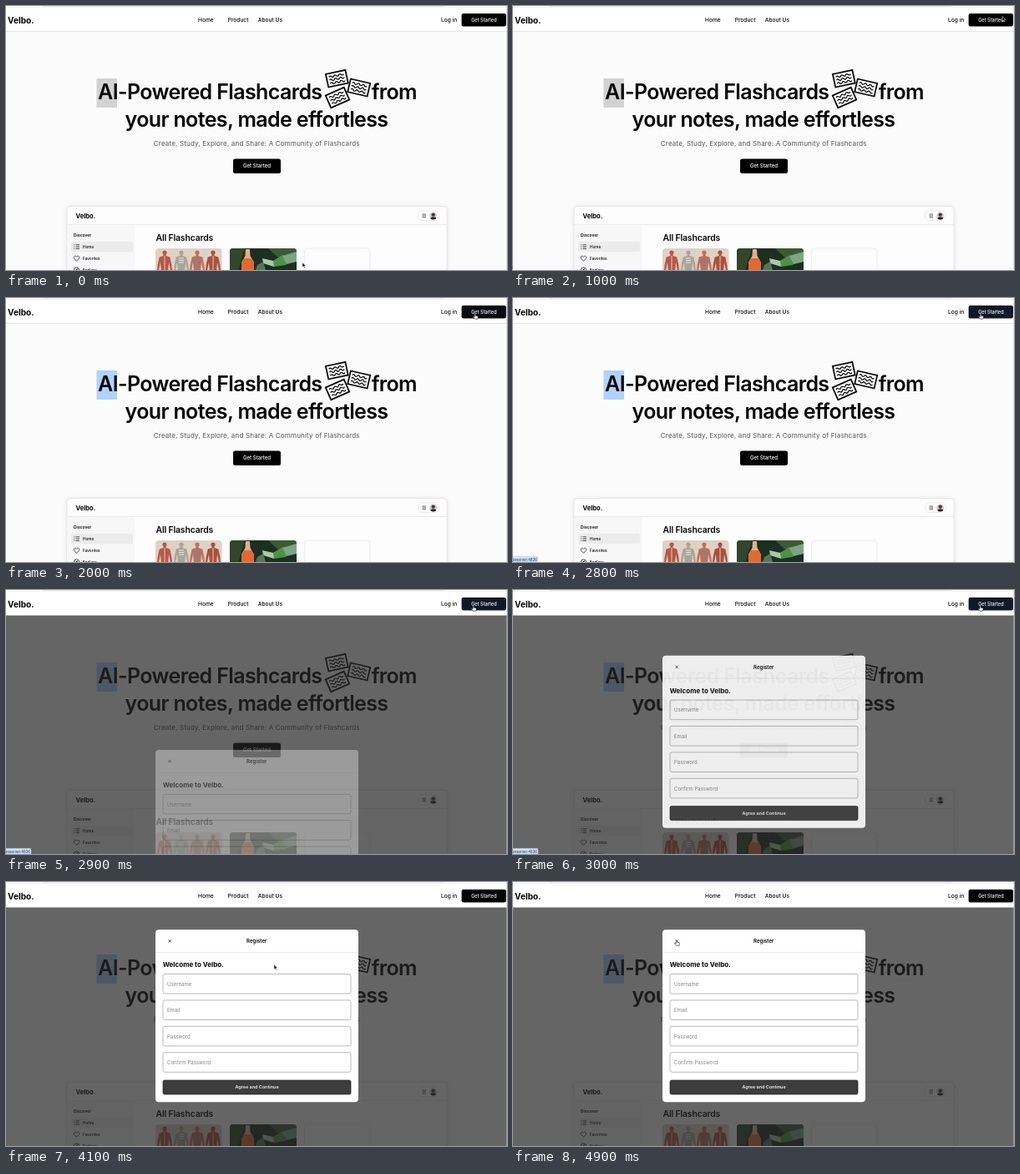
Animation, 600 px wide and 317 px high, one loop 5000 ms. Source, as an HTML page:

```html
<!DOCTYPE html>
<html lang="en">
<head>
<meta charset="utf-8">
<title>Flashcards</title>
<style>
  html, body { margin: 0; width: 100%; height: 100%; overflow: hidden; background: #fbfbfb; }
  svg { display: block; width: 100vw; height: 100vh; }
  text { font-family: Inter, Roboto, sans-serif; font-weight: 500; fill: #050505; }
  .logo { font-weight: 700; }
  .mid { text-anchor: middle; }
  .hero { font-size: 25px; font-weight: 600; letter-spacing: -.025em; }
  .sub { font-size: 8px; font-weight: 400; letter-spacing: .18px; fill: #555; }
  .nav { font-size: 6.6px; }
  .side { font-size: 4.7px; }
  .semi { font-weight: 600; }
  .light { fill: #fff; }
  .label { font-size: 6px; font-weight: 400; fill: #858585; }
  .line { fill: none; stroke: #222; stroke-width: .8; }
</style>
</head>
<body>
<svg viewBox="0 0 600 317">
  <defs>
    <g id="sheet" fill="none" stroke="#0a0a0a">
      <rect x="-12" y="-8" width="24" height="16" fill="#fff" stroke-width="1.8"/>
      <path id="wave" stroke-width="1.3" d="M-9-3.8q1.5-2 3 0t3 0 3 0 3 0 3 0 3 0"/>
      <use href="#wave" y="4"/>
      <use href="#wave" y="8"/>
    </g>
    <g id="body">
      <circle cy="296" r="2.6"/>
      <path d="M-1.2 298h2.4l.5 2 4.6 1.5 2 9 .7 7H7l-2-10-.8 10h-8.4L-5 307.500l-2 10H-9l.7-7 2-9L-1.700 300z"/>
    </g>
    <clipPath id="thumbA"><rect x="179" y="291" width="79.500" height="40" rx="4"/></clipPath>
    <clipPath id="thumbB"><rect x="268" y="291" width="80" height="40" rx="4"/></clipPath>
    <clipPath id="face"><circle cx="511.700" cy="252" r="4.600"/></clipPath>
    <filter id="soft" x="-10%" y="-10%" width="120%" height="120%"><feGaussianBlur stdDeviation="2.500"/></filter>
  </defs>

  <rect width="600" height="317" fill="#fbfbfb"/>

  <!-- Hero -->
  <rect id="mark" x="108.500" y="87" width="24.500" height="35"/>
  <text class="hero mid" x="244.300" y="111.500">AI-Powered Flashcards</text>
  <text class="hero mid" x="464.800" y="111.500">from</text>
  <text class="hero mid" x="300" y="144.500">your notes, made effortless</text>
  <use href="#sheet" transform="translate(396.300 87.200) rotate(-12)"/>
  <use href="#sheet" transform="translate(422.700 98) rotate(13)"/>
  <use href="#sheet" transform="translate(397 110) rotate(-24)"/>
  <text class="sub mid" x="300.300" y="168">Create, Study, Explore, and Share: A Community of Flashcards</text>
  <rect x="272" y="183.500" width="57" height="17.500" rx="2.500"/>
  <text class="mid light" x="300.500" y="194.400" font-size="6.100">Get Started</text>

  <!-- Dashboard preview -->
  <rect x="73" y="241" width="455" height="90" rx="4" fill="#bbb" opacity=".45" filter="url(#soft)"/>
  <rect x="73" y="240.500" width="455" height="90" rx="4" fill="#fdfdfd" stroke="#e2e2e2" stroke-width=".8"/>
  <rect x="73.400" y="262.500" width="81" height="60" fill="#f7f7f7"/>
  <path d="M73 262.500H528" stroke="#e8e8e8" stroke-width=".8"/>
  <text class="logo" x="83.500" y="254.800" font-size="7.600">Velbo.</text>
  <rect x="493.500" y="246" width="24.500" height="11.500" rx="4.500" fill="#fff" stroke="#e0e0e0" stroke-width=".7"/>
  <path class="line" d="M498.500 250h4.500m-4.500 1.900h4.500m-4.500 1.900h4.500" style="stroke-width:.7"/>
  <g clip-path="url(#face)">
    <rect x="507" y="247" width="10" height="10" fill="#d5d0cc"/>
    <circle cx="511.700" cy="250.600" r="2.200" fill="#4a3a34"/>
    <ellipse cx="511.700" cy="256.500" rx="4" ry="3.300" fill="#23252b"/>
  </g>
  <text class="semi" x="81" y="277" font-size="5">Discover</text>
  <rect x="78" y="283" width="74" height="12.300" rx="2" fill="#ebebeb"/>
  <path class="line" d="M83.500 286.800h4.500m-4.500 2.300h4.500m-4.500 2.300h4.500M81.300 286.800h1m-1 2.300h1m-1 2.300h1"/>
  <path class="line" d="M84.500 306.300l-2.900-3c-1.500-2.200 1.400-4.400 2.900-2 1.500-2.400 4.400-.2 2.900 2z"/>
  <circle class="line" cx="84.500" cy="317" r="3.200"/>
  <path d="M86.300 315l-1.200 2.600-2.400 1.300 1.200-2.600z" fill="#222"/>
  <text class="side" x="92" y="291.200">Home</text>
  <text class="side" x="92" y="304.900">Favorites</text>
  <text class="side" x="92" y="318.700">Explore</text>
  <text class="semi" x="179.500" y="281.500" font-size="10.400" letter-spacing="-.15">All Flashcards</text>

  <g clip-path="url(#thumbA)">
    <rect x="179" y="291" width="80" height="30" fill="#dfd2c3"/>
    <use href="#body" x="190" fill="#b4584a"/>
    <use href="#body" x="210" fill="#a9a59a"/>
    <use href="#body" x="229" fill="#c0705c"/>
    <use href="#body" x="248" fill="#a9503f"/>
    <path d="M190 300v17M248 300v17" stroke="#e2b8a4" stroke-width="1.200"/>
    <path d="M207 303h6m-6 2.500h6m-6 2.500h6" stroke="#eee6d6"/>
    <path d="M229 298v20m-3-15v10m6-10v10" stroke="#6c8798" stroke-width=".8"/>
  </g>
  <g clip-path="url(#thumbB)">
    <rect x="268" y="291" width="80" height="30" fill="#1d2f20"/>
    <path d="M268 291h18l-8 26h-10z" fill="#33452a"/>
    <path d="M314 291h34v10l-20 3z" fill="#3d5a35"/>
    <path d="M287 292h5l.5 8 4.500 8v10h-15v-10l4.500-8z" fill="#dfb28d"/>
    <path d="M285 303h9.500l2.500 6v9h-15v-9z" fill="#e06a32"/>
    <path d="M307 303l13 3 6-3 3 4-8 6-13-4z" fill="#a9c9a6"/>
    <path d="M320 306l11-7 10 3-6 9-14 2z" fill="#4e9148"/>
    <path d="M331 300l17-5v12l-12 3z" fill="#7da486"/>
    <path d="M301 311l7-4 3 10h-12z" fill="#55765a"/>
  </g>
  <rect x="357.500" y="291" width="78.500" height="40" rx="4" fill="#fcfcfc" stroke="#e9e9e9" stroke-width=".8"/>

  <!-- Dialog -->
  <g id="dialog">
    <rect y="30" width="600" height="287" fill="#262626" fill-opacity=".7"/>
    <g id="panel">
      <rect x="179" y="57.200" width="243" height="207" rx="4" fill="#fff"/>
      <path d="M179 84.500H422" stroke="#e6e6e6" stroke-width=".8"/>
      <path id="close" d="M194.500 69.200l3.400 3.400m0-3.400l-3.400 3.400" stroke="#222" stroke-width=".8"/>
      <text class="semi mid" x="300.300" y="73.200" font-size="6.100">Register</text>
      <text class="logo" x="187.700" y="102.200" font-size="8">Welcome to Velbo.</text>
      <g id="fields"></g>
      <rect x="188" y="238" width="225" height="17" rx="2" fill="#3d3d3d" stroke="#1f1f1f" stroke-width=".7"/>
      <text class="semi mid" x="300.500" y="248.400" font-size="5.450" style="fill:#f2f2f2">Agree and Continue</text>
    </g>
  </g>

  <!-- Top bar -->
  <rect width="600" height="30" fill="#fff"/>
  <path d="M0 30.400H600" stroke="#dedede" stroke-width=".8"/>
  <path d="M0 1.500H600" stroke="#f1f1f1"/>
  <path d="M44 .3H525" stroke="#dcdcdc" stroke-width=".7"/>
  <path d="M599.700 0V317" stroke="#cfcfcf" stroke-width=".6"/>
  <text class="logo" x="2" y="20.500" font-size="10.100">Velbo.</text>
  <text class="nav" x="230" y="19.300">Home</text>
  <text class="nav" x="265.700" y="19.300">Product</text>
  <text class="nav" x="301.800" y="19.300">About Us</text>
  <text class="nav" x="521" y="19.300">Log in</text>
  <rect id="start" x="545.600" y="9" width="53.400" height="15.500" rx="2.200"/>
  <text class="mid light" x="572.400" y="18.800" font-size="5.600">Get Started</text>

  <g id="status">
    <path d="M0 310.300H28.500q1.500 0 1.500 1.500V317H0z" fill="#cfe0f6" stroke="#b4c6df" stroke-width=".4"/>
    <text x="-.5" y="315.600" font-size="4.200" style="fill:#33445c">evserver:4826</text>
  </g>

  <g stroke-linejoin="round">
    <path id="arrow" d="M0 0v5.600l1.300-1.200.9 2 1-.4-.9-2h1.700z" fill="#000" stroke="#fff" stroke-width=".5"/>
    <path id="hand" d="M-.7.500q.7-.9 1.300 0v2.200l2.300.5q.7.300.5 1.200l-.5 2.300h-3.300l-2.200-2.600q.2-.9 1.200-.4l.7.500z" fill="#fff" stroke="#111" stroke-width=".6"/>
  </g>
</svg>
<script>
const LOOP = 5000, STEP = 100;
const $ = id => document.getElementById(id);
const clamp = v => Math.min(1, Math.max(0, v));
const between = (t, a, b) => t >= a && t < b;
const show = (id, on) => $(id).setAttribute('visibility', on ? 'visible' : 'hidden');

// Pointer tip: time, x, y
const path = [
  [0, 355, 308], [400, 355, 308], [1000, 586, 12.5], [1300, 584, 11], [1900, 562, 18.5],
  [2800, 560, 18.5], [3150, 559.5, 18.5], [3500, 338, 103], [4000, 331, 101],
  [4600, 196.5, 78], [4900, 196, 69.7], [LOOP, 196, 69.7]
];

// cubic-bezier(.4, 0, .2, 1)
function ease(x) {
  let lo = 0, hi = 1, s;
  for (let i = 0; i < 24; i++) {
    s = (lo + hi) / 2;
    const r = 1 - s;
    if (1.2 * r * r * s + .6 * r * s * s + s ** 3 < x) lo = s; else hi = s;
  }
  return 3 * (1 - s) * s * s + s ** 3;
}

function pointer(t) {
  const i = path.findIndex(p => p[0] > t);
  const [t0, x0, y0] = path[i - 1], [t1, x1, y1] = path[i];
  const u = (t - t0) / (t1 - t0), k = u * u * (3 - 2 * u);
  return [x0 + (x1 - x0) * k, y0 + (y1 - y0) * k];
}

$('fields').innerHTML = ['Username', 'Email', 'Password', 'Confirm Password'].map((label, i) => {
  const y = 110.5 + i * 31.4;
  return `<rect x="188" y="${y}" width="225" height="23.6" rx="2.2" fill="#fff" stroke="#b3b3b3" stroke-width=".9"/>
    <text class="label" x="193" y="${y + 14.3}">${label}</text>`;
}).join('');

function draw() {
  const t = Math.floor(performance.now() % LOOP / STEP) * STEP;

  $('mark').setAttribute('fill', between(t, 1500, LOOP) ? '#b0d2fb' : '#d2d2d2');

  const glow = ease(clamp((t - 1900) / 300)) - ease(clamp((t - 3300) / 300));
  $('start').setAttribute('fill', `rgb(${[17, 24, 39].map(c => Math.round(c * glow))})`);

  const rise = ease(clamp((t - 2812) / 300));
  show('dialog', t >= 2900);
  $('panel').setAttribute('opacity', rise);
  $('panel').setAttribute('transform', `translate(0 ${(1 - rise) * 207})`);

  show('status', between(t, 2400, 3600));

  const overClose = t >= 4700;
  $('close').setAttribute('opacity', overClose ? .7 : 1);

  const hand = between(t, 1900, 3300) || overClose;
  const move = `translate(${pointer(t)})`;
  for (const id of ['arrow', 'hand']) $(id).setAttribute('transform', move);
  show('arrow', !hand);
  show('hand', hand);

  requestAnimationFrame(draw);
}
draw();
</script>
</body>
</html>
```
